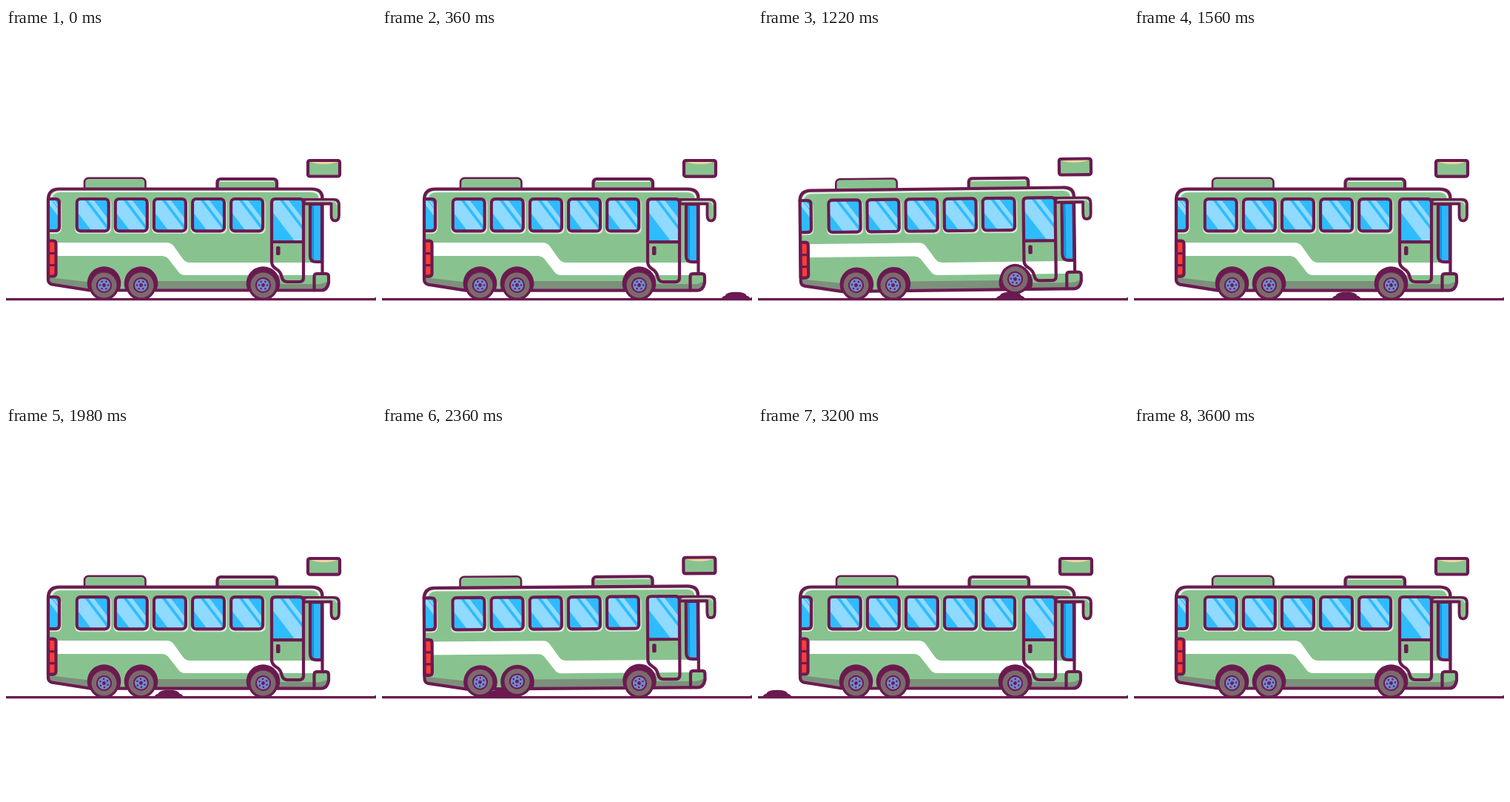
Recreate the animation shown at these times as an HTML page. Size 500 by 500 pixels, loop 3620 ms.

```html
<!DOCTYPE html>
<html lang="en">
<head>
<meta charset="utf-8">
<title>Bus</title>
<style>
  html, body { margin: 0; width: 100%; height: 100%; overflow: hidden; background: #fff; }
  #stage { display: block; width: 100vw; height: 100vh; }
  .line { stroke: #6b1a50; stroke-width: 4.2; stroke-linejoin: round; stroke-linecap: round; }
  .ink { fill: #6b1a50; }
  .green { fill: #88c38f; }
  .shade { fill: #7c907b; }
  .pale { fill: #d9e8da; }
  .white { fill: #fff; }
  .none { fill: none; }
</style>
</head>
<body>
<svg id="stage" viewBox="0 0 500 500">
  <defs>
    <clipPath id="shell">
      <path d="M57 232Q57 217.500 72 217.500H413Q427.500 217.500 427.500 230V331H436V345Q434 354.500 426 354.500H113L62 346.500Q57 345 57 340Z"/>
    </clipPath>
  </defs>
  <path class="line none" style="stroke-width:3.200" d="M-2 366.700H502"/>
  <path class="ink" d="M496 366Q498 364 500 364V367H496Z"/>
  <path id="bump" class="ink" d="M-20.500 368Q-19.500 363 -14.500 361.800Q-13 356.800 0 356.800Q13 356.800 14.500 361.800Q19.500 363 20.500 368Z"/>
  <g id="body">
    <rect class="line green" style="stroke-width:2.600" x="106" y="202.700" width="82.500" height="20" rx="5.500"/>
    <rect class="line green" x="285.500" y="204" width="80.500" height="19" rx="4.500"/>
    <path class="none" stroke="#e3f0e4" stroke-width="1.600" d="M289 207H362"/>
    <rect class="line green" x="408" y="179" width="43" height="21.500" rx="2.500"/>
    <path fill="#f0d3a2" d="M411 180.900H448.500Q440 184 430 184Q419 184 411 180.900Z"/>

    <g clip-path="url(#shell)">
      <rect class="green" x="50" y="210" width="395" height="150"/>
      <path class="none" stroke="#e6f1e6" stroke-width="2.600" d="M60.500 240V234Q61 221 74 220.800H412Q423 221 424 230"/>
      <path class="shade" d="M57 335Q60 337 66 338L113 343.500V360H57ZM200 342H330V360H200ZM364 346H440V360H364Z"/>
      <path class="white" d="M57 290H217Q223 290 226.500 294.500L239 312Q242.500 317 249 317H428V334H242Q236.500 334 233.500 330L219 311.500Q216 308 210 308H57Z"/>
    </g>
    <g id="panes"></g>

    <path class="line none" d="M359 289V316Q359 322 365 325.500Q371 329 372.500 336Q374 343 380 343H396.500Q402 343 402 337.500V289"/>
    <rect class="ink" x="365" y="295" width="5.500" height="12" rx="1.800"/>

    <path class="line" fill="#2bb7fb" d="M427 238H411V308Q411 316 419 316H427Z"/>
    <path fill="#1d8fdc" d="M413 240H416V313Q413 311 413 307Z"/>

    <path class="line" fill="#fb3d35" d="M57 287.500H63.500Q67.500 287.500 67.500 291.500V331.500Q67.500 335.500 63.500 335.500H57Z"/>
    <path class="line none" style="stroke-width:3.200" d="M57 304.500H67M57 320.500H67"/>

    <path class="line none" d="M57 232Q57 217.500 72 217.500H413Q427.500 217.500 427.500 230V331M416 354.500H113L62 346.500Q57 345 57 340V232"/>
    <path class="green" d="M416 332H436V345Q434 354.500 426 354.500H416Z"/>
    <path class="shade" d="M416 346Q428 347 435 342Q436 354 426 354.500H416Z"/>
    <path class="line none" d="M420 332H432.500Q436 332 436 336V344Q434 354.500 426 354.500H416.500V336Q416.500 332 420 332Z"/>
    <path class="line green" style="stroke-width:3.800" d="M402.500 231.800H443.500Q450 231.800 450 238.500V253Q450 260.500 444.500 260.500Q439.500 260.500 439.500 253V237.500H402.500Z"/>
    <path class="none" stroke="#c9e2cb" stroke-width="1.300" d="M406 234.200H442Q446.500 234.500 447 239"/>
    <g id="arches"></g>
  </g>
  <g id="wheels"></g>
</svg>
<script>
const LOOP = 3620;
const AXLES = [132.5, 182.5, 347.5];
const AXLE_Y = 347.5;
const TURNS = 5;
const BOBS = 9;
const el = id => document.getElementById(id);

// Glass with two diagonal reflections, clipped by its nested viewport
function glass(x, y, w, h) {
  const run = h * 0.76;
  const band = (a, b) =>
    `<path d="M${a * w} 0H${b * w}L${b * w + run} ${h}H${a * w + run}Z"/>`;
  return `<svg x="${x}" y="${y}" width="${w}" height="${h}">
    <rect width="${w}" height="${h}" fill="#2ebcff"/>
    <g fill="#8fdafe">${band(-0.3, 0.22)}${band(0.33, 0.5)}</g></svg>`;
}

function pane(x, y, w, h) {
  return `<rect class="pale" x="${x - 2.5}" y="${y}" width="${w + 6}" height="${h + 3.8}" rx="6"/>` +
    glass(x, y, w, h) +
    `<rect class="line none" x="${x}" y="${y}" width="${w}" height="${h}" rx="5"/>`;
}

function hub() {
  let bolts = "";
  for (let i = 0; i < 6; i++) {
    const a = i * Math.PI / 3;
    bolts += `<circle class="ink" cx="${(5.6 * Math.cos(a)).toFixed(2)}" cy="${(5.6 * Math.sin(a)).toFixed(2)}" r="1.25"/>`;
  }
  return `<circle class="ink" r="10.600"/><circle r="8.600" fill="#7189cb"/>
    <circle class="ink" r="2.400"/>${bolts}`;
}

let panes = "";
for (let i = 0; i < 5; i++) panes += pane(95.7 + i * 52.1, 231, 43, 43.3);
panes += `<path class="pale" d="M57 231H69Q75 233 75 240V272Q74 278 67 278H57Z"/>` +
  glass(57, 231, 14, 43) +
  `<path class="line none" d="M57 231H67Q72 231 72 236V269Q72 274 67 274H57"/>`;
panes += glass(359.5, 231, 42, 58) +
  `<path class="line none" d="M359 289V236Q359 231 364 231H397Q402 231 402 236V289Z"/>`;
el("panes").innerHTML = panes;

el("arches").innerHTML = AXLES.map(x =>
  `<path class="ink" d="M${x - 20.5} 355A22.800 22.800 0 1 1 ${x + 20.5} 355Z"/>`).join("");
el("wheels").innerHTML = AXLES.map(() =>
  `<g><circle class="ink" r="20.500"/><circle r="17" fill="#7c6a6c"/><g>${hub()}</g></g>`).join("");

const wheels = [...el("wheels").children];
const bell = (v, mid, width) => Math.exp(-(((v - mid) / width) ** 2));

// Nose lifts over the bump, then the rear axles rock the body
function tilt(t) {
  return -1.15 * bell(t, 1300, 110)
    + 0.4 * bell(t, 2210, 75) - 0.42 * bell(t, 2370, 80)
    + 0.4 * bell(t, 2540, 75) - 0.35 * bell(t, 2680, 65);
}

function draw(t) {
  const bumpX = 535.7 - 0.1593 * t;
  const bob = 0.4 * (1 - Math.cos(2 * Math.PI * BOBS * t / LOOP));
  const spin = 360 * TURNS * t / LOOP;
  el("bump").setAttribute("transform", `translate(${bumpX} 0)`);
  el("body").setAttribute("transform", `translate(0 ${bob}) rotate(${tilt(t)} 243 275)`);
  wheels.forEach((wheel, i) => {
    const lift = 9 * bell(bumpX, AXLES[i], 20);
    wheel.setAttribute("transform", `translate(${AXLES[i]} ${AXLE_Y - lift})`);
    wheel.lastElementChild.setAttribute("transform", `rotate(${spin})`);
  });
}

const start = performance.now();
function tick() {
  draw((performance.now() - start) % LOOP);
  requestAnimationFrame(tick);
}
draw(0);
requestAnimationFrame(tick);
</script>
</body>
</html>
```
